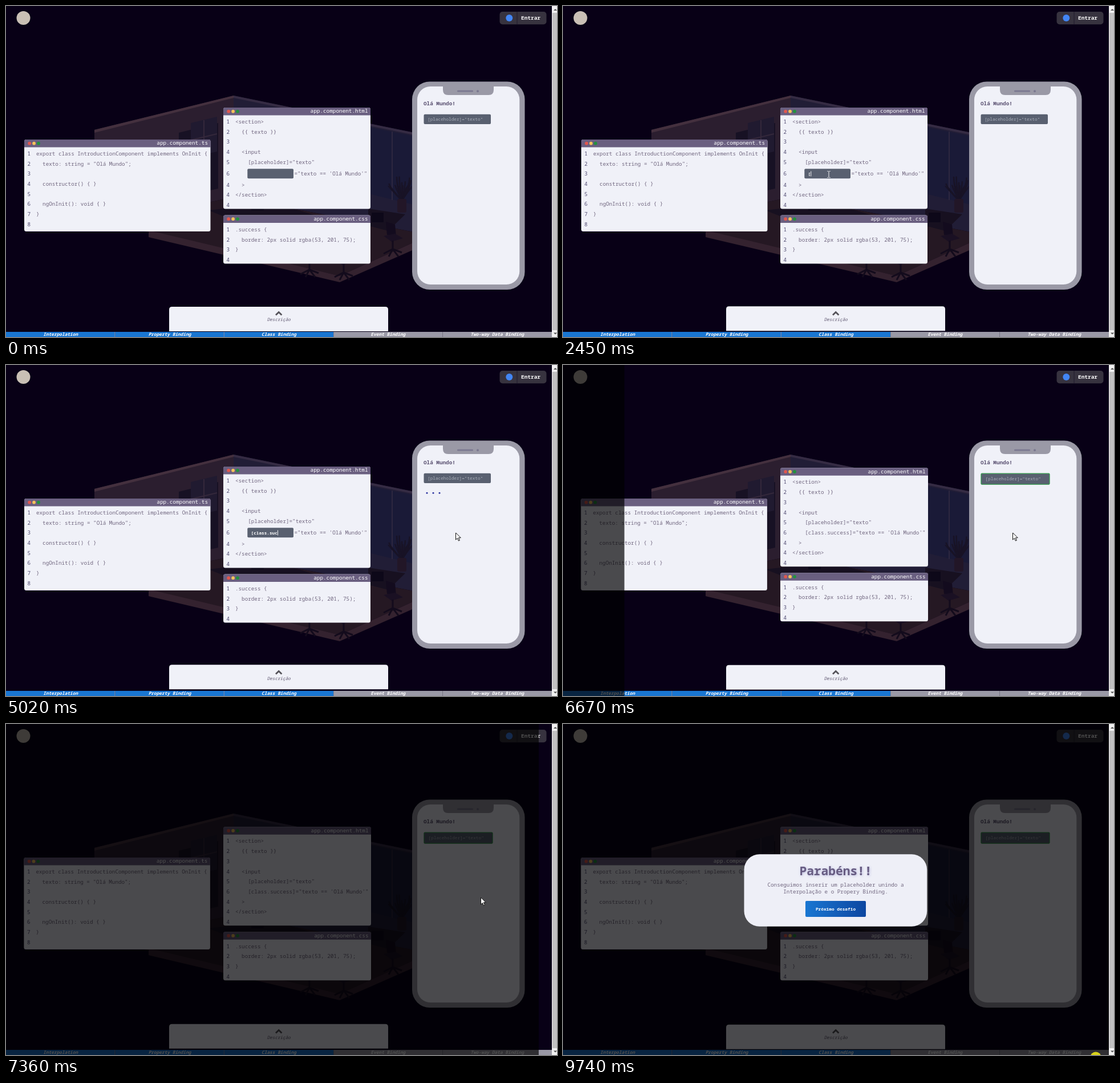
Recreate the animation shown at these times as an HTML page. Size 966 by 580 pixels, loop 9.81 s.

```html
<!DOCTYPE html>
<html lang="pt">
<head>
<meta charset="utf-8">
<title>Class Binding</title>
<style>
html, body { margin: 0; width: 100%; height: 100%; overflow: hidden; background: #080016; }
svg { display: block; width: 966px; height: 580px; }
text { font-family: "Noto Sans Mono", "DejaVu Sans Mono", monospace; white-space: pre; }
</style>
</head>
<body>
<svg id="stage" viewBox="0 0 966 580"></svg>
<script>
const LOOP = 9810, SOLVED = 6400, TYPE_START = 2400, KEY_MS = 285;
const PAPER = '#f0f1f8', PLUM = '#6a5f80', SLATE = '#596070', GREY = '#9a99a6';
const CODE = 9.28, SMALL = 7.72;

const esc = s => s.replace(/&/g, '&amp;').replace(/</g, '&lt;');
const rect = (x, y, w, h, fill, r = 0, more = '') =>
  `<rect x="${x}" y="${y}" width="${w}" height="${h}" rx="${r}" fill="${fill}" ${more}/>`;
const circle = (x, y, r, fill, more = '') => `<circle cx="${x}" cy="${y}" r="${r}" fill="${fill}" ${more}/>`;
const poly = (points, fill) => `<polygon points="${points}" fill="${fill}"/>`;
const path = (d, stroke, width, fill = 'none') =>
  `<path d="${d}" fill="${fill}" stroke="${stroke}" stroke-width="${width}"/>`;
// y is the middle of the lower-case letters
const text = (s, x, y, size, fill, more = '') =>
  `<text x="${x}" y="${y + size * .31}" font-size="${size}" fill="${fill}" ${more}>${esc(s)}</text>`;
const group = (id, body, more = '') => `<g id="${id}" ${more}>${body}</g>`;
const BOLD = 'font-weight="700"', MID = 'text-anchor="middle"', END = 'text-anchor="end"';

function editor(title, x, y, w, h, lines) {
  const head = `M${x} ${y + 13.5}v-10.5q0-3 3-3h${w - 6}q3 0 3 3v10.5z`;
  let out = rect(x, y, w, h, PAPER, 3.5) + path(head, 'none', 0, PLUM);
  ['#e0574f', '#f5c25b', '#23913f'].forEach((c, i) => out += circle(x + 9.2 + i * 7.9, y + 6.7, 2.9, c));
  out += text(title, x + w - 4.5, y + 6.6, 9.35, '#fff', END);
  for (const [n, s, cy] of lines)
    out += text(String(n), x + 5.6, cy, CODE, '#4f4a70') + text(s, x + 21, cy, CODE, '#70667f');
  return out;
}

const number = (lines, y) => lines.map((s, i) => [i + 1, s, y + i * 17.7]);

const tsLines = number([
  'export class IntroductionComponent implements OnInit {',
  '  texto: string = "Olá Mundo";', '', '  constructor() { }', '',
  '  ngOnInit(): void { }', '}', ''], 259);
const cssLines = y => number(['.success {', '  border: 2px solid rgba(53, 201, 75);', '}', ''], y);

function htmlLines(y, gap, sixth) {
  const lines = ['<section>', '  {{ texto }}', '', '  <input', '    [placeholder]="texto"', sixth, '  >', '</section>', ''];
  return lines.map((s, i) => [i > 5 ? 4 : i + 1, s, y + i * 17.7 + (i > 4 ? gap : 0) + (i > 5 ? gap : 0)]);
}

function chair(x, y) {
  return poly(`${x - 10},${y - 30} ${x + 6},${y - 25} ${x + 8},${y - 4} ${x - 8},${y - 7}`, '#130b1e') +
    poly(`${x - 14},${y - 5} ${x + 6},${y - 9} ${x + 20},${y - 1} ${x},${y + 5}`, '#1a1023') +
    path(`M${x + 2} ${y + 3}v15m-16 8l16-8 16 6m-23 7l7-13 10 13`, '#130b1c', 3);
}

function plant(x, y) {
  let out = '';
  for (let i = 0; i < 15; i++) {
    const a = -Math.PI * (.1 + .8 * i / 14), r = 18 + 9 * Math.sin(i * 5);
    out += path(`M${x} ${y + 25}q${Math.cos(a) * r} -25 ${Math.cos(a) * r} ${Math.sin(a) * r - 18}`, '#181326', 2.5);
  }
  return out + rect(x - 8, y + 22, 16, 24, '#221627', 3);
}

const room =
  poly('155,217 399,157 399,335 155,385', '#2b1e2f') +
  poly('155,217 399,157 399,161 155,222', '#44303e') +
  poly('399,157 735,226 735,400 399,335', '#211d36') +
  poly('399,157 735,226 735,230 399,161', '#352b43') +
  poly('303,222 372,205 372,320 303,335', '#171124') +
  poly('324,205 370,194 370,255 324,265', '#201a30') +
  path('M347 200v60M324 235l46-11', '#34283b', 2) +
  poly('640,213 714,228 714,348 640,330', '#1a1a37') +
  path('M677 220v120', '#2d2740', 2) +
  poly('155,385 399,335 735,400 735,405 585,473 250,396', '#251823') +
  poly('250,393 585,473 735,405 735,418 585,484 250,405', '#34222f') +
  poly('355,358 470,345 560,372 440,392', '#171020') +
  poly('635,355 700,365 670,394 635,385', '#171020') +
  rect(641, 362, 21, 17, '#0d0819', 1) + rect(430, 340, 22, 18, '#0d0819', 1) +
  chair(676, 408) + chair(590, 449) + chair(530, 444) + plant(694, 316);

const tabs = ['Interpolation', 'Property Binding', 'Class Binding', 'Event Binding', 'Two-way Data Binding']
  .map((s, i) => rect(i * 191.4, 571, 191.4, 9, i < 3 ? '#1976d2' : GREY) +
    (i && i < 3 ? rect(i * 191.4 - 1, 571, 1, 9, '#7d8cae') : '') +
    text(s, i * 191.4 + 95.7, 576, 7.8, '#fff', `${BOLD} font-style="italic" ${MID}`)).join('');

const before = editor('app.component.html', 381, 178, 258, 177.5, htmlLines(203.2, 2.2, '')) +
  rect(423.3, 285.3, 80.7, 17, SLATE, 2) +
  text('="texto == \'Olá Mundo\'"', 505.5, 294, CODE, '#70667f') +
  `<text id="typed" x="429.5" y="296.6" font-size="${SMALL}" font-weight="700" fill="#fff"></text>` +
  rect(0, 289.5, .9, 9, '#fff', 0, 'id="caret"') +
  editor('app.component.css', 381, 366.5, 258, 85, cssLines(392)) +
  rect(732.5, 189.7, 117.5, 17.3, SLATE, 2) +
  text('[placeholder]="texto"', 739, 198.3, SMALL, '#a9aeb9') +
  group('dots', [738, 749, 760].map(x => circle(x, 224.3, 1.5, '#2d35a0')).join(''));

const after = editor('app.component.html', 381, 180.3, 259, 173, htmlLines(205.6, 0, '    [class.success]="texto == \'Olá Mundo\'"')) +
  editor('app.component.css', 381, 364.2, 259, 85, cssLines(389.7)) +
  rect(733, 190.2, 120, 19, SLATE, 1.5, 'stroke="#2f9a48" stroke-width="1.2"') +
  text('[placeholder]="texto"', 740.5, 199.6, SMALL, '#a9aeb9');

const phone = rect(712, 132.5, 197.5, 364.5, GREY, 31) + rect(721, 141, 179.3, 347, PAPER, 23) +
  path('M766 141h89v6q0 9-9 9h-71q-9 0-9-9z', 'none', 0, GREY) +
  rect(791, 147.8, 28, 2.8, '#7b7890', 1.4) + circle(827, 149.2, 2, '#7b7890') +
  text('Olá Mundo!', 732, 171.5, 9.3, '#5c5373', BOLD);

const modal = rect(317.5, 228.3, 320.7, 126.5, '#eeeff7', 27) +
  text('Parabéns!!', 478, 258, 21.2, '#675c82', `${BOLD} ${MID} style="text-shadow:1px 1px 4px #b9b9dd"`) +
  text('Conseguimos inserir um placeholder unindo a', 478, 282.3, CODE, '#70667f', MID) +
  text('Interpolação e o Propery Binding.', 478, 294, CODE, '#70667f', MID) +
  rect(425, 310, 106, 28, 'url(#blue)', 2) +
  text('Próximo desafio', 478, 324.3, 7.8, '#fff', `${BOLD} ${MID}`);

const stage = document.getElementById('stage');
stage.innerHTML =
  '<defs><linearGradient id="blue"><stop stop-color="#1976d2"/><stop offset="1" stop-color="#0d47a1"/></linearGradient></defs>' +
  rect(0, 0, 966, 580, '#080016') + room +
  circle(30.5, 21, 12, '#c9c0b5') +
  rect(865.5, 10, 82, 22.3, '#37333f', 5) + rect(895.5, 10, 1, 22.3, '#211b2c') +
  circle(882.3, 21, 6, '#4285f4') + text('Entrar', 903, 21, 9.45, '#fff', BOLD) +
  group('ts', editor('app.component.ts', 32, 234, 326.5, 161, tsLines)) + phone +
  group('before', before) + group('after', after) + tabs +
  group('panel', path('M286 570v-38q0-5 5-5h374q5 0 5 5v38z', 'none', 0, PAPER)) +
  path('M473 541.5l5.2-5 5.2 5', '#55535a', 2.8) +
  group('label', text('Descrição', 478.3, 550, 7.65, '#5f5770', `font-style="italic" ${MID}`)) +
  rect(0, 0, 0, 580, '#000', 0, 'id="shade" fill-opacity=".69"') + group('modal', modal) +
  circle(934, 584, 9.5, '#d8d21c', 'id="spot"') +
  rect(957, 0, 9, 580, '#f1f1f1') + rect(958, 12, 8, 556, '#c1c1c1') +
  poly('960,8 966,8 963,5', '#505050') + poly('960,572.5 966,572.5 963,575.5', '#505050') +
  group('beam', path('M463 289.5h2q1 0 1 1v9q0 1-1 1h-2m6-11h-2q-1 0-1 1v9q0 1 1 1h2', '#c4c6cc', 1)) +
  group('arrow', path('M0 0v12.2l2.9-2.7 2 4.6 2-.9-2-4.4h3.9z', '#111', 1, '#fff'));

const el = {};
stage.querySelectorAll('[id]').forEach(e => el[e.id] = e);
const show = (e, on) => e.style.display = on ? '' : 'none';
const clamp = v => Math.max(0, Math.min(1, v));

// cubic-bezier(.25, .1, .25, 1)
function ease(p) {
  p = clamp(p);
  if (p === 0 || p === 1) return p;
  let lo = 0, hi = 1, u;
  for (let i = 0; i < 24; i++) {
    u = (lo + hi) / 2;
    const x = .75 * u * (1 - u) + u ** 3;
    if (x < p) lo = u; else hi = u;
  }
  return .3 * u * (1 - u) ** 2 + 3 * u * u * (1 - u) + u ** 3;
}

// time, x, y of the pointer tip
const track = [[3600, 466, 295], [4300, 788.5, 294], [6750, 788.5, 294], [7360, 832.5, 304],
  [7780, 841, 309], [9050, 841, 309], [9380, 872, 582]];

function pointer(t) {
  let i = 0;
  while (i < track.length - 2 && t > track[i + 1][0]) i++;
  const [t0, x0, y0] = track[i], [t1, x1, y1] = track[i + 1];
  const p = clamp((t - t0) / (t1 - t0)), k = p * p * (3 - 2 * p);
  return `translate(${x0 + (x1 - x0) * k} ${y0 + (y1 - y0) * k})`;
}

function draw(t) {
  const solved = t >= SOLVED;
  show(el.before, !solved);
  show(el.after, solved);
  el.ts.setAttribute('transform', `translate(${solved ? -.6 : 0} 0)`);

  const keys = t < TYPE_START ? 0 : 1 + Math.floor((t - TYPE_START) / KEY_MS);
  const typed = '[class.success]'.slice(0, keys);
  el.typed.textContent = typed;
  el.caret.setAttribute('x', 429.7 + typed.length * SMALL * .6);
  show(el.caret, t >= 2100);
  show(el.dots, t >= 2600);

  const lift = -.85 * (1 - Math.cos(t * Math.PI / 1000));
  el.panel.setAttribute('transform', `translate(0 ${lift})`);
  el.label.setAttribute('transform', `translate(0 ${lift * .5})`);

  el.shade.setAttribute('width', 957 * ease((t - 6560) / 1000));
  el.modal.setAttribute('opacity', ease((t - 7990) / 750));

  show(el.beam, t >= 1500 && t < 3600);
  show(el.arrow, t >= 3600 && t < 9380);
  el.arrow.setAttribute('transform', pointer(t));
  show(el.spot, t >= 9600);
  el.spot.setAttribute('cy', 584 + 6 * clamp((9740 - t) / 140));
}

const start = performance.now();
function tick() {
  draw((performance.now() - start) % LOOP);
  requestAnimationFrame(tick);
}
tick();
</script>
</body>
</html>
```
